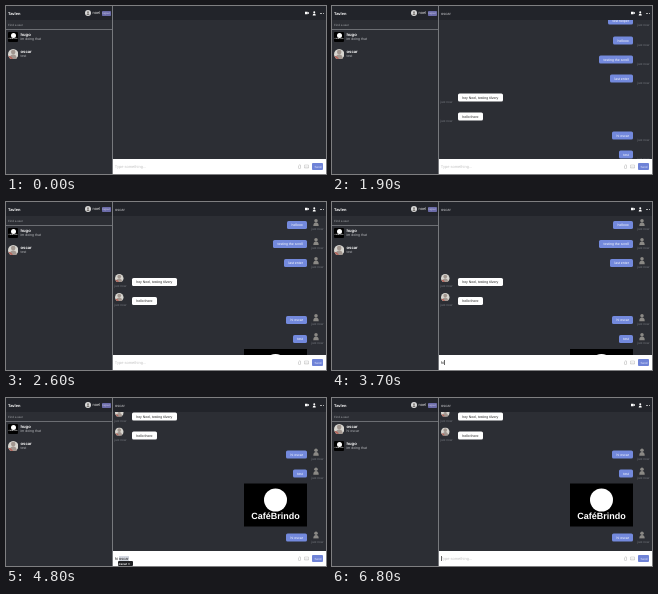
An HTML page that plays this animation: 320x168 px, repeating every 6900 ms.

```html
<!DOCTYPE html>
<html lang="en">
<head>
<meta charset="utf-8">
<title>Chat</title>
<style>
html, body { margin: 0; width: 100%; height: 100%; overflow: hidden; background: #2c2e34; }
body { position: relative; font-family: "Liberation Sans", Arial, sans-serif; text-rendering: geometricPrecision; }
div, span, svg { position: absolute; }
.layer { left: 0; top: 0; width: 320px; height: 168px; }
#view { clip-path: inset(14px 0 15px 107px); }
.text { white-space: nowrap; line-height: 6px; margin-top: -3px; }
.bubble { box-sizing: border-box; height: 8px; margin-top: -4px; padding: 0 4.2px; border-radius: 1.6px;
  font-size: 3.5px; line-height: 8px; white-space: nowrap; background: #fff; color: #222; left: 126px; }
.bubble.mine { left: auto; right: 19px; background: #7389dc; color: #fff; }
.logo { background: #000; }
.logo span { left: 0; width: 100%; text-align: center; color: #fff; font-weight: bold; white-space: nowrap; }
</style>
</head>
<body>
<div id="view" class="layer"><div id="log" class="layer"></div></div>
<div id="ui" class="layer"></div>
<script>
const LOOP = 6900, FRIEND = "oscar", DRAFT = "hi " + FRIEND;
const $ = id => document.getElementById(id);

const layer = (id, inner) => `<div id="${id}" class="layer">${inner}</div>`;
const box = (x, y, w, h, color, extra = "", inner = "") =>
  `<div style="left:${x}px;top:${y}px;width:${w}px;height:${h}px;background:${color};${extra}">${inner}</div>`;
const text = (x, y, size, color, label, extra = "") =>
  `<span class="text" style="left:${x}px;top:${y}px;font-size:${size}px;color:${color};${extra}">${label}</span>`;
const svg = (x, y, w, h, body, extra = "") =>
  `<svg ${extra} style="left:${x}px;top:${y}px" width="${w}" height="${h}" viewBox="0 0 10 10">${body}</svg>`;

const person = color => `<circle cx="5" cy="3" r="2.2" fill="${color}"/><path d="M1.6 10Q1.6 5.4 5 5.4T8.4 10Z" fill="${color}"/>`;
const friendFace = (x, y, size, extra) => svg(x, y, size, size,
  `<circle cx="5" cy="5" r="5" fill="#d8d6d0"/>${person("#a1968f")}<path d="M.5 7Q3 6 5 10Q2 9.8 .5 7" fill="#b5655b"/>`, extra);
const logo = (x, y, w, h, r, cy, size, textY, radius = 0) =>
  `<div class="logo" style="left:${x}px;top:${y}px;width:${w}px;height:${h}px;border-radius:${radius}px">` +
  box(w / 2 - r, cy - r, 2 * r, 2 * r, "#fff", "border-radius:50%") +
  `<span style="top:${textY}px;font-size:${size}px;line-height:${size}px">CaféBrindo</span></div>`;

function message(y, label, mine) {
  const avatar = mine ? svg(305.7, y - 6.7, 8, 8.5, person("#8b8985"), 'class="avatar"')
                      : friendFace(109, y - 8, 8.5, 'class="avatar"');
  return `<div class="bubble${mine ? " mine" : ""}" style="top:${y}px">${label}</div>` +
    avatar + text(mine ? 305.5 : 108.5, y + 4, 3.2, "#777a80", "just now");
}

const history = ["test helper", "hellooo", "testing the scroll", "last enter",
  "hey Noel, testing tilvery", "hello there", DRAFT, "test"];
$("log").innerHTML =
  history.map((label, i) => message(3.4 + 19.1 * i, label, i < 4 || i > 5)).join("") +
  logo(238, 147, 63, 42.5, 11.5, 16.5, 9, 28) +
  layer("sent", message(200.5, DRAFT, true));

const row = (id, name, avatar) => layer(id, avatar +
  text(14.5, 29.1, 4.2, "#fff", name, "font-weight:bold") +
  '<span class="text last" style="left:14.5px;top:33.3px;font-size:3.6px;color:#b4b6ba"></span>');

$("ui").innerHTML =
  box(0, 0, 320, 14, "#22242a") +
  text(2, 8.2, 4, "#fff", "Tavlen", "font-weight:bold") +
  box(79, 4.4, 6, 6, "#d9d9d9", "border-radius:50%", svg(1, 1, 4, 4, person("#77736f"))) +
  text(86.5, 7.2, 4, "#ddd", "noel") +
  box(95.5, 4.7, 9.5, 5.3, "#6b6ba8", "border-radius:.8px") +
  text(96.6, 8, 2.6, "#d8d8ee", "logout") +
  text(2, 19.2, 3, "#a2a4a8", "Find a user") +
  box(0, 23, 106, .7, "#6c6e73") +
  row("hugo", "hugo", logo(2, 26, 10, 10, 2.5, 3.8, 1.7, 7.2, 1)) +
  row("friend", FRIEND, friendFace(1.8, 26, 10.4)) +
  box(106.2, 0, .8, 168, "#77797d") +
  layer("title", text(109, 8.1, 4, "#c6c7ca", FRIEND)) +
  svg(299, 5.4, 4, 4, '<path d="M0 2H6.5V4.5L10 2.5V7.5L6.5 5.5V8H0Z" fill="#fff"/>') +
  svg(306, 5.1, 4.5, 4.5, person("#fff")) +
  [313.5, 315.2, 316.9].map(x => box(x, 7, 1, 1, "#ddd", "border-radius:50%")).join("") +
  box(107, 152.7, 213, 15.3, "#fff") +
  layer("mark", box(113.2, 158, 10, 5, "#d5d9e2")) +
  text(108.7, 160.6, 4, "#c4c4c4", "").replace("<span", '<span id="input"') +
  layer("caret", box(108.6, 158, .5, 5, "#666")) +
  svg(291, 157.8, 5, 5.5, '<path d="M3 3V7a2 2 0 0 0 4 0V2.5a1.5 1.5 0 0 0-3 0" fill="none" stroke="#aaa"/>') +
  svg(298, 158, 5, 5, '<path d="M1 2H9V8H1ZM1 8L4 5L6 7L7.5 5.5L9 7" fill="none" stroke="#bbb"/>') +
  box(305.6, 157, 11.8, 7, "#6f83d7", "border-radius:.9px") +
  text(308.5, 161, 3, "#e8ebff", "Send") +
  layer("hint", box(111.5, 163.2, 15, 5, "#202124", "border-radius:1px") +
    text(112.6, 166.2, 3.2, "#fff", FRIEND + " ×", "font-weight:bold"));

const show = (id, on) => $(id).style.visibility = on ? "visible" : "hidden";
const lastText = id => $(id).querySelector(".last");
const avatars = document.querySelectorAll(".avatar");
lastText("hugo").textContent = "im doing that";

function render(now) {
  const t = Math.floor(now % LOOP / 100) * 100;
  const opened = t >= 1900, loaded = t >= 2200, cleared = t >= 5200;

  // Loaded avatars shift the list; sending scrolls to the end.
  const end = Math.min(1, Math.max(0, (t - 4600) / 200));
  $("log").style.transform = `translateY(${(loaded ? 0 : 11.5) - 61.5 * end}px)`;
  show("log", opened);
  show("title", opened);
  avatars.forEach(a => a.style.opacity = loaded ? 1 : 0);
  $("sent").style.opacity = t >= 4700 ? 1 : 0;

  const typed = t < 3200 || cleared ? "" : DRAFT.slice(0, 1 + Math.floor((t - 3200) / 170));
  const input = $("input");
  input.textContent = typed || "Type something...";
  input.style.color = typed ? "#222" : "#c4c4c4";
  $("caret").style.left = (typed ? input.getBoundingClientRect().width : 0) + "px";
  show("caret", t >= 3200 && t < 4500 || cleared && (t < 5900 || t >= 6400));
  const hinted = t >= 4600 && !cleared;
  show("mark", hinted);
  show("hint", hinted);

  // The latest conversation moves to the top.
  $("friend").style.top = cleared ? "0" : "16.8px";
  $("hugo").style.top = cleared ? "16.8px" : "0";
  lastText("friend").textContent = cleared ? DRAFT : "test";
}

const start = performance.now();
(function tick() {
  render(performance.now() - start);
  requestAnimationFrame(tick);
})();
</script>
</body>
</html>
```
